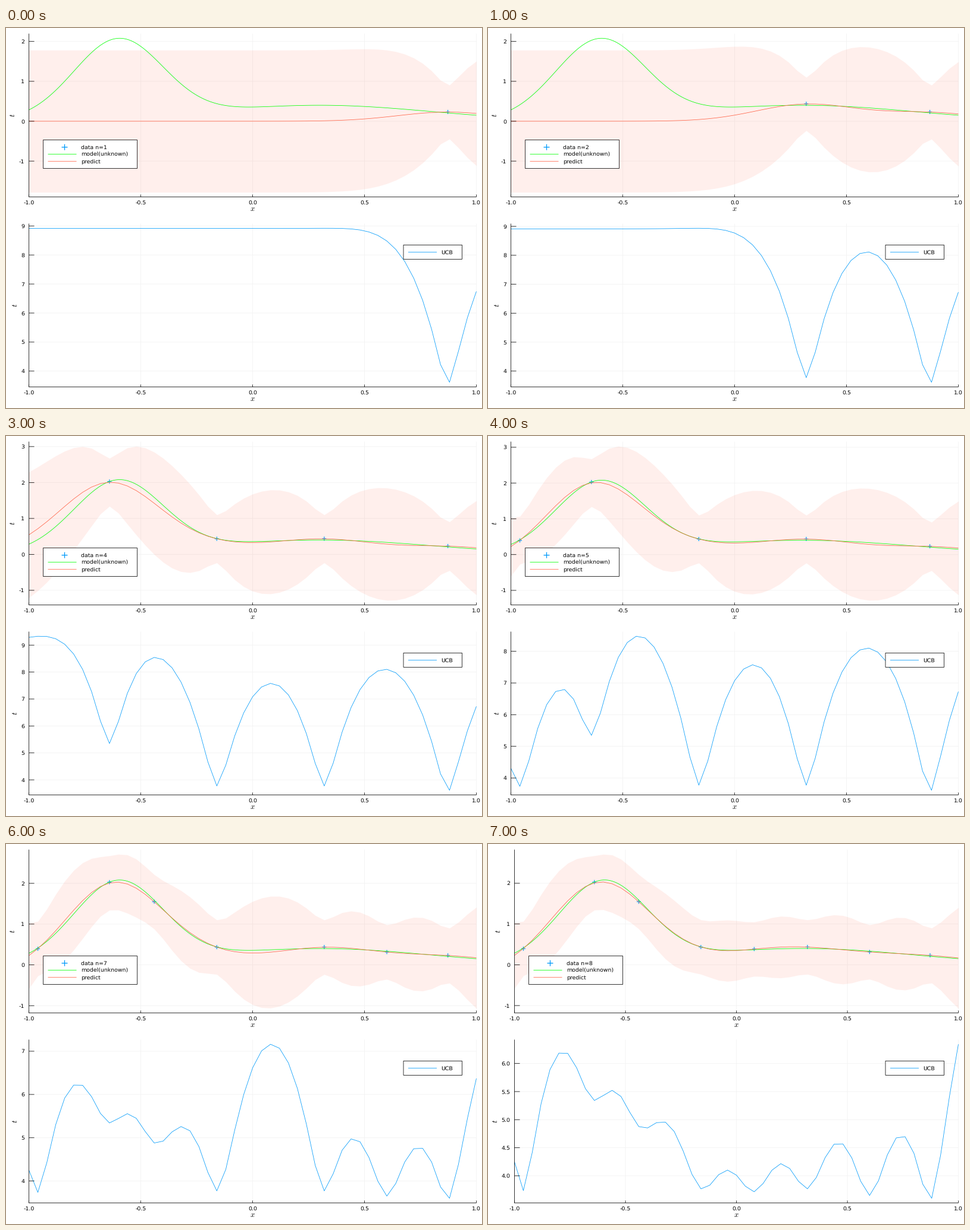
Animation of 800 by 640 pixels, one loop 8 s. Source, as a matplotlib script:

```python
import numpy as np
import matplotlib.pyplot as plt
from matplotlib.animation import FuncAnimation
from matplotlib.patches import Rectangle

W, H, DPI = 800, 640, 100
PT = 72 / DPI                      # points per pixel
FONT = 9.4                         # text size in pixels
RIGHT, TOP, BOTTOM, PANEL = 790.5, 9.5, 284.5, 320
BLUE, GREEN, CORAL = "#009afa", "#00ff00", "#ff6347"
LINE = 0.78                        # stroke of curves, axes and boxes

plt.rcParams.update({
    "font.family": "DejaVu Sans",
    "mathtext.fontset": "cm",
    "text.hinting": "none",
    "path.simplify": False,
    "path.snap": False,
})

# Samples in the order in which they are taken
XS = np.array([0.8726, 0.32, -0.16, -0.64, -0.96, -0.44, 0.6, 0.08])
TS = np.array([0.232, 0.437, 0.435, 2.028, 0.395, 1.548, 0.315, 0.386])
GRID = np.linspace(-1, 1, 51)
FINE = np.linspace(-1, 1, 301)
AMP, GAMMA, NOISE = 10.0, 10.0, 0.1


def model(x):
    return (2 * np.exp(-(x + 0.6) ** 2 / 0.08)
            + 0.4 * np.exp(-(x - 0.3) ** 2 / 0.5))


def kernel(a, b):
    return AMP * np.exp(-GAMMA * (a[:, None] - b[None, :]) ** 2)


def regress(n):
    """Gaussian process mean and spread on the grid after n samples."""
    xs, ts = XS[:n], TS[:n]
    cov = kernel(xs, xs) + NOISE * np.eye(n)
    cross = kernel(GRID, xs)
    mean = cross @ np.linalg.solve(cov, ts)
    explained = np.sum(cross * np.linalg.solve(cov, cross.T).T, axis=1)
    return mean, (AMP + NOISE - explained) ** 0.25


fig = plt.figure(figsize=(W / DPI, H / DPI), dpi=DPI, facecolor="white")
ax = fig.add_axes([0, 0, 1, 1])


def line(x, y, color="black", width=LINE, z=3):
    ax.plot(x, y, color=color, lw=width * PT, zorder=z,
            solid_capstyle="butt", solid_joinstyle="round")


def text(x, y, s, ha="left"):
    """Text whose capitals are centred on y."""
    ax.text(x, y + 0.365 * FONT, s, fontsize=FONT * PT, ha=ha,
            va="baseline", color="black", zorder=8)


def guide(x, y, s, rotation=0):
    ax.text(x, y, s, fontsize=12.9 * PT, ha="center", va="center",
            rotation=rotation, color="black", zorder=8)


def plus(x, y, size, width, z):
    r = size / 2
    line([x - r, x + r], [y, y], BLUE, width, z)
    line([x, x], [y - r, y + r], BLUE, width, z)


def box(x0, y0, x1, y1):
    ax.add_patch(Rectangle((x0, y0), x1 - x0, y1 - y0, fc="white",
                           ec="black", lw=LINE * PT, zorder=6))


class Panel:
    """Maps data to stage pixels and draws the axes of one plot."""

    def __init__(self, row, left, low, high):
        self.left = left
        self.top, self.bottom = TOP + row * PANEL, BOTTOM + row * PANEL
        pad = 0.03 * (high - low)
        self.low, self.high = low - pad, high + pad

    def x(self, v):
        return self.left + (np.asarray(v) + 1) / 2 * (RIGHT - self.left)

    def y(self, v):
        part = (np.asarray(v) - self.low) / (self.high - self.low)
        return self.bottom - part * (self.bottom - self.top)

    def curve(self, xs, ys, color):
        line(self.x(xs), self.y(ys), color, z=4)

    def frame(self, step):
        left, top, bottom = self.left, self.top, self.bottom
        for v in (-1, -0.5, 0, 0.5, 1):
            px = self.x(v)
            line([px, px], [top, bottom], "#f2f2f2", z=1)
            line([px, px], [bottom, bottom - 4], z=5)
            text(px, bottom + 9.4, f"{v:.1f}", "center")
        first, last = np.ceil(self.low / step), np.floor(self.high / step)
        for v in np.arange(first, last + 1) * step:
            py = self.y(v)
            label = f"{v:.0f}" if step == 1 else f"{v:.1f}"
            line([left, RIGHT], [py, py], "#f2f2f2", z=1)
            line([left, left + 9], [py, py], z=5)
            text(left - 7.3, py, label.replace("-0", "0"), "right")
        line([left, left, RIGHT], [top, bottom, bottom], z=5)

        # the vertical guide sits beyond the widest tick label
        ems = 1.59 if step < 1 else 0.997 if self.low < -1 else 0.636
        guide(left - 17.6 - ems * FONT, (top + bottom) / 2, "$t$", 90)
        guide((left + RIGHT) / 2, bottom + 20, "$x$")


def draw_fit(n, left, mean, spread):
    upper, lower = mean + spread, mean - spread
    p = Panel(0, left, lower.min(), max(upper.max(), model(FINE).max()))
    p.frame(1)
    ax.fill_between(p.x(GRID), p.y(lower), p.y(upper), color=CORAL,
                    alpha=0.1, lw=0, zorder=2)
    for x, t in zip(XS[:n], TS[:n]):
        plus(p.x(x), p.y(t), 7, 1.2, 3)
    p.curve(FINE, model(FINE), GREEN)
    p.curve(GRID, mean, CORAL)

    box(left + 24, 188.5, left + 182, 236.5)
    plus(left + 60, 200.7, 10, 1.3, 7)
    rows = ((f"data n={n}", None), ("model(unknown)", GREEN),
            ("predict", CORAL))
    for i, (label, color) in enumerate(rows):
        y = 200.6 + 12 * i
        if color:
            line([left + 32, left + 80], [y, y], color, z=7)
        text(left + 87.2, y, label)


def draw_ucb(left, ucb, step):
    p = Panel(1, left, ucb.min(), ucb.max())
    p.frame(step)
    p.curve(GRID, ucb, BLUE)
    box(668, 365.4, 766.5, 389.4)
    line([676, 724], [377.4, 377.4], BLUE, z=7)
    text(731, 377.4, "UCB")


def draw(i):
    ax.clear()
    ax.set(xlim=(0, W), ylim=(H, 0))
    ax.axis("off")
    mean, spread = regress(i + 1)
    ucb = mean + 5 * spread
    step = 0.5 if np.ptp(ucb) < 3 else 1
    left = 38.5 if step == 1 else 44.5
    draw_fit(i + 1, left, mean, spread)
    draw_ucb(left, ucb, step)
    return ax.get_children()


anim = FuncAnimation(fig, draw, frames=len(XS), interval=1000, repeat=True)
plt.show()
```
